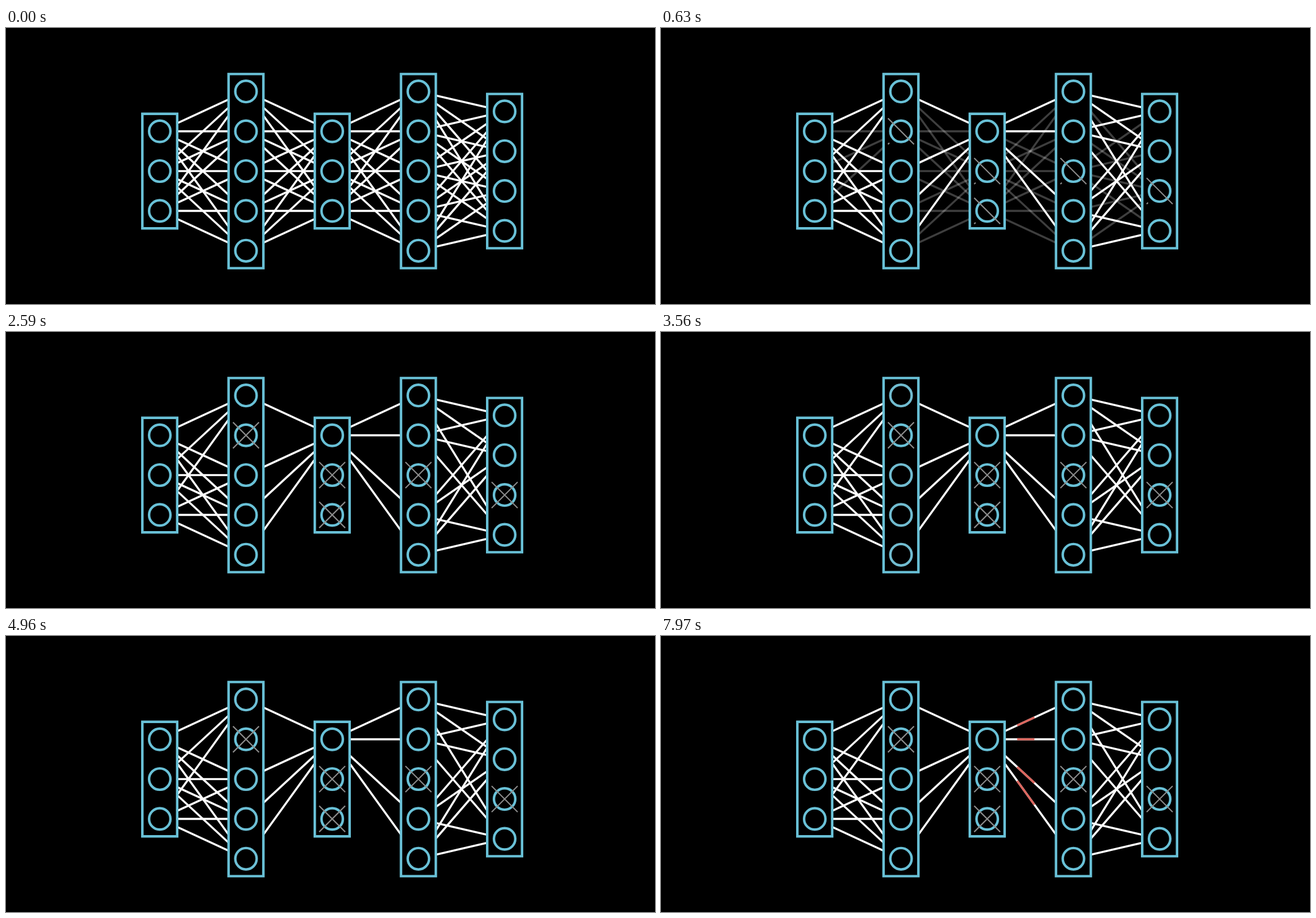
Recreate the animation shown at these times as an HTML page with a canvas. Size 1148x488 px, loop 8000 ms.

```html
<!DOCTYPE html>
<html lang="en">
<head>
<meta charset="utf-8">
<title>Dropout forward pass</title>
<style>
  html, body { margin: 0; width: 100%; height: 100%; overflow: hidden; background: #000; }
  canvas { display: block; }
</style>
</head>
<body>
<canvas id="stage" width="1148" height="488"></canvas>
<script>
const ctx = document.getElementById('stage').getContext('2d');
const LOOP = 8000, STEP = 70;
const BLUE = [105, 193, 215], RED = [236, 112, 103];
const CROSS = '#8c8c8c', FLASH = '#dc665e';
const FADE = 250, HOLD = 1000, PASS = 1000, TAIL = 0.2;
const LAYER_TIME = 2 * FADE + HOLD + PASS;

const layers = [[3, []], [5, [1]], [3, [1, 2]], [5, [2]], [4, [2]]].map(([count, dropped], col) => ({
  x: 272 + 152.5 * col,
  half: (count - 1) * 35.2 + 30.8,
  nodes: Array.from({ length: count }, (_, i) => ({
    x: 272 + 152.5 * col,
    y: 253 + (i - (count - 1) / 2) * 70.4,
    off: dropped.includes(i)
  }))
}));

const edges = [];
layers.slice(1).forEach((next, col) => {
  for (const a of layers[col].nodes)
    for (const b of next.nodes) edges.push({ a, b, col, off: a.off || b.off });
});

const clamp = v => Math.min(1, Math.max(0, v));
const mix = (a, b, p) => a + (b - a) * p;
const sigmoid = v => 1 / (1 + Math.exp(-v));
const EDGE = sigmoid(-5);
const smooth = v => clamp((sigmoid(10 * (clamp(v) - 0.5)) - EDGE) / (1 - 2 * EDGE));
const tint = p => `rgb(${BLUE.map((c, i) => Math.round(mix(c, RED[i], p)))})`;

// Strokes the part of a-b between the fractions from and to.
function line(a, b, color, width, from = 0, to = 1) {
  if (to <= from) return;
  ctx.strokeStyle = color;
  ctx.lineWidth = width;
  ctx.beginPath();
  ctx.moveTo(mix(a.x, b.x, from), mix(a.y, b.y, from));
  ctx.lineTo(mix(a.x, b.x, to), mix(a.y, b.y, to));
  ctx.stroke();
}

function cross({ x, y }, p) {
  const r = 23;
  line({ x: x - r, y: y - r }, { x: x + r, y: y + r }, CROSS, 2.2, 0, smooth(2 * p));
  line({ x: x - r, y: y + r }, { x: x + r, y: y - r }, CROSS, 2.2, 0, smooth(2 * p - 1));
}

function draw(time) {
  const drop = clamp(time / 1000);
  const since = col => time - 1000 - col * LAYER_TIME;

  ctx.fillStyle = '#000';
  ctx.fillRect(0, 0, 1148, 488);

  for (const { a, b, off } of edges) {
    ctx.globalAlpha = off ? 1 - smooth(drop) : 1;
    line(a, b, '#fff', 3.6);
  }
  ctx.globalAlpha = 1;

  for (const { a, b, col, off } of edges) {
    const p = (since(col) - 2 * FADE - HOLD) / PASS;
    if (off || p <= 0 || p >= 1) continue;
    const head = (1 + TAIL) * smooth(p);
    line(a, b, FLASH, 3.8, clamp(head - TAIL), clamp(head));
  }

  layers.forEach(({ x, half, nodes }, col) => {
    const t = since(col);
    const glow = smooth(t / FADE) - smooth((t - FADE - HOLD) / FADE);
    ctx.lineWidth = 4.4;
    ctx.strokeStyle = tint(0);
    ctx.beginPath();
    ctx.rect(x - 30.8, 253 - half, 61.6, 2 * half);
    ctx.fill();
    ctx.stroke();
    for (const n of nodes) {
      ctx.lineWidth = 4.4;
      ctx.strokeStyle = tint(n.off ? 0 : glow);
      ctx.beginPath();
      ctx.arc(n.x, n.y, 18.9, 0, 2 * Math.PI);
      ctx.stroke();
      if (n.off) cross(n, drop);
    }
  });
}

const start = performance.now();
function tick() {
  const t = (performance.now() - start) % LOOP;
  draw(Math.floor((t + 10) / STEP) * 70.2 - 20);
  requestAnimationFrame(tick);
}
tick();
</script>
</body>
</html>
```
